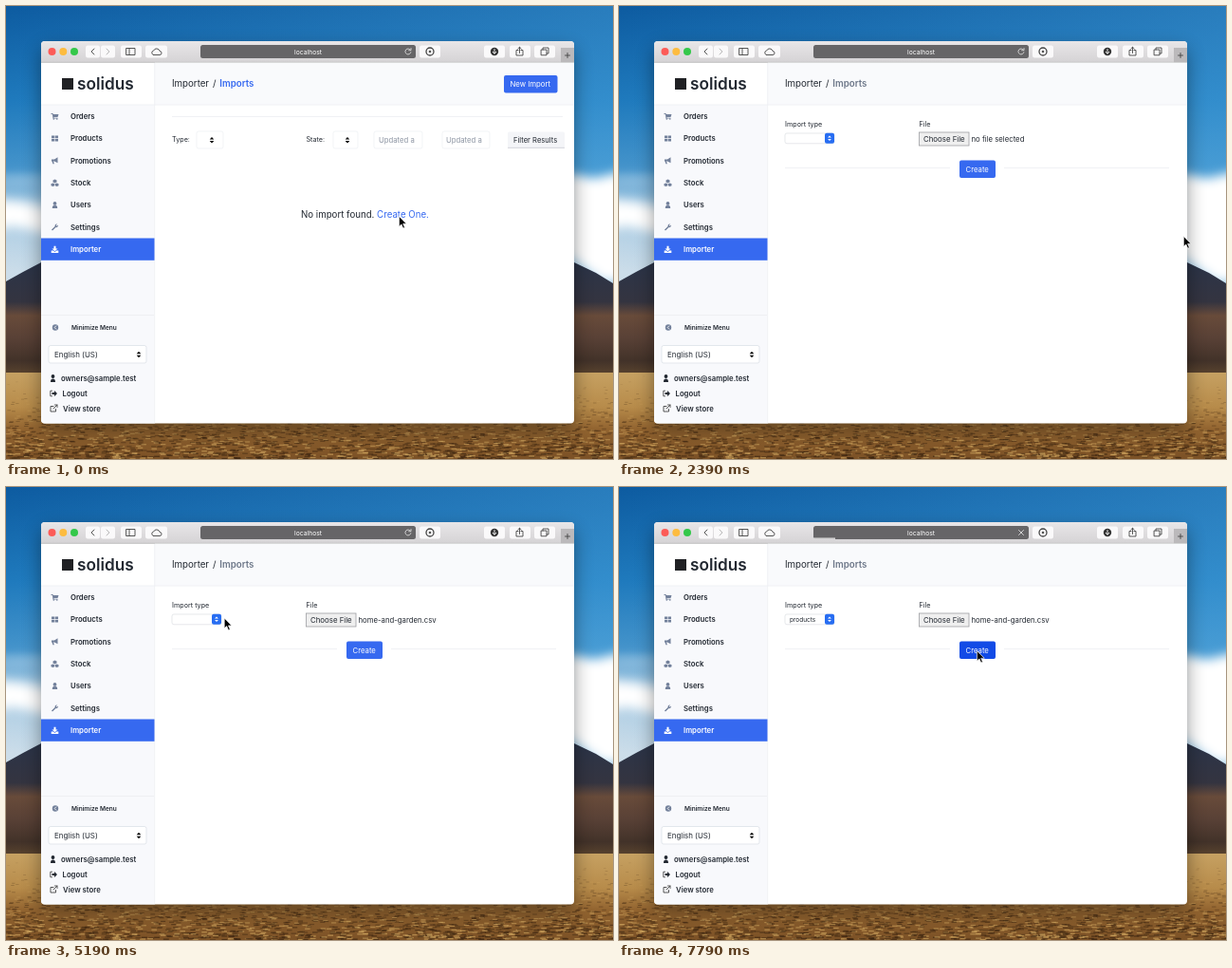
Recreate the animation shown at these times as an HTML page. Size 640x477 px, loop 7990 ms.

```html
<!DOCTYPE html>
<html lang="en">
<head>
<meta charset="utf-8">
<title>Importer</title>
<style>
  html, body { margin: 0; width: 100%; height: 100%; overflow: hidden; }
  svg { display: block; width: 100%; height: 100%; }
  text { font: 400 7.75px Inter, sans-serif; fill: #222831; white-space: pre; }
  .strong { font-weight: 600; }
  .label { font-size: 7.2px; }
  .title { font-size: 9.7px; }
  .small { font-size: 6.5px; }
  .link { fill: #3669f0; }
  .light { fill: #fff; }
  .muted { fill: #8d95a3; }
  .line { fill: none; stroke: #444; stroke-width: .9; stroke-linecap: round; stroke-linejoin: round; }
  .rule { stroke: #eceef2; stroke-width: .8; }
  .button { fill: #3669f0; }
</style>
</head>
<body>
<svg viewBox="0 0 640 477" preserveAspectRatio="none">
  <defs>
    <linearGradient id="sky" x2="0" y2="1">
      <stop stop-color="#0d5ba0"/><stop offset=".25" stop-color="#1f7abd"/>
      <stop offset=".43" stop-color="#4594cb"/><stop offset=".52" stop-color="#a3c8e2"/>
      <stop offset=".7" stop-color="#ccdde9"/>
    </linearGradient>
    <linearGradient id="glow">
      <stop stop-color="#4ba6e0" stop-opacity="0"/><stop offset="1" stop-color="#4ba6e0" stop-opacity=".45"/>
    </linearGradient>
    <linearGradient id="hill" x2="0" y2="1">
      <stop stop-color="#2b3448"/><stop offset=".34" stop-color="#343440"/>
      <stop offset=".46" stop-color="#684b3a"/><stop offset=".65" stop-color="#594136"/>
      <stop offset=".85" stop-color="#423229"/><stop offset="1" stop-color="#614930"/>
    </linearGradient>
    <linearGradient id="field" x2="0" y2="1">
      <stop stop-color="#c6a162"/><stop offset=".4" stop-color="#b78b4a"/>
      <stop offset=".65" stop-color="#926430"/><stop offset="1" stop-color="#7b5126"/>
    </linearGradient>
    <linearGradient id="bar" x2="0" y2="1">
      <stop stop-color="#e8e6e8"/><stop offset="1" stop-color="#d5d3d5"/>
    </linearGradient>
    <filter id="soft" x="-50%" y="-50%" width="200%" height="200%"><feGaussianBlur stdDeviation="6"/></filter>
    <filter id="shade" x="-20%" y="-20%" width="140%" height="150%"><feGaussianBlur stdDeviation="10"/></filter>
    <filter id="near" x="-30%" y="-30%" width="160%" height="180%"><feGaussianBlur stdDeviation="2.5"/></filter>
    <clipPath id="frame"><rect x="37" y="37" width="562" height="402.5" rx="4"/></clipPath>
    <path id="updown" d="M-2.3-.8 0-3.3 2.3-.8zM-2.3.8 0 3.3 2.3.8z"/>
  </defs>

  <!-- landscape -->
  <rect width="640" height="400" fill="url(#sky)"/>
  <rect width="640" height="400" fill="url(#glow)"/>
  <g fill="#fff" filter="url(#soft)">
    <path d="M-20 203 20 207 50 214V242L10 232-20 236z"/>
    <path d="M590 176 620 182 660 172V290H630L590 262z"/>
    <ellipse cx="15" cy="183" rx="30" ry="4" opacity=".35"/>
  </g>
  <path d="M0 290 18 280 37 270H599L622 281 640 292V392H0z" fill="url(#hill)"/>
  <rect y="386" width="640" height="91" fill="url(#field)"/>
  <g id="grass"></g>

  <!-- window -->
  <rect x="37" y="45" width="562" height="401" rx="8" opacity=".4" filter="url(#shade)"/>
  <g clip-path="url(#frame)">
    <rect x="37" y="37" width="562" height="403" fill="#fff"/>
    <rect x="37" y="37" width="562" height="22.5" fill="url(#bar)"/>
    <path d="M37 59.3H599" stroke="#b5b3b5" stroke-width=".7"/>
    <circle cx="48.5" cy="48" r="4" fill="#fc5b57"/>
    <circle cx="60.3" cy="48" r="4" fill="#fdbc40"/>
    <circle cx="72" cy="48" r="4" fill="#34c84a"/>
    <g id="tools" fill="#faf9fa"></g>
    <path class="line" d="M93 45l-3 3 3 3M127 44.5h9v7h-9zM130 44.5v7M155.5 51.5h6.5a2 2 0 0 0 0-4 3.3 3.3 0 0 0-6.3-.5 2.3 2.3 0 0 0-.2 4.5M540 46.5h-2v5.5h7v-5.5h-2M541.5 49.5v-6M539.7 45l1.8-1.7 1.8 1.7M566 46v-2h6v6h-2M564.5 46h5.5v5.8h-5.5z"/>
    <path class="line" d="M106 45l3 3-3 3" opacity=".4"/>
    <circle cx="447" cy="48" r="4" class="line" style="stroke-width:1.3"/><circle cx="447" cy="48" r="1.3" fill="#555"/>
    <circle cx="515" cy="48" r="4.2" fill="#333"/>
    <path d="M515 45.5v4.5M513.2 48.3l1.8 1.9 1.8-1.9" class="line" style="stroke:#fff"/>
    <path d="M585 44h14v15.5h-14z" fill="#bbb9bb"/>
    <path class="line" d="M589.5 52h5M592 49.5v5"/>
    <rect x="205" y="41" width="227" height="14" rx="2.5" fill="#666567"/>
    <text x="304" y="50.6" class="light" style="font-size:6.8px">localhost</text>
    <path id="reload" class="line" style="stroke:#ddd" d="M426.5 46.3a3 3 0 1 0 .4 2.4M427 44.5v2.2h-2.3"/>
    <path id="stop" class="line" style="stroke:#ddd" d="M421.5 45.5l5 5M426.5 45.5l-5 5"/>
    <rect id="progress" x="205" y="53.5" height="1.4" fill="#ddd"/>

    <!-- sidebar and header -->
    <rect x="37" y="104" width="119.5" height="336" fill="#f8f9fc"/>
    <rect x="157" y="59.7" width="442" height="44.3" fill="#f9fafc"/>
    <path class="rule" d="M37 104H599M156.7 60V440M37 325.5H156"/>
    <rect x="59" y="76" width="12" height="12" fill="#202124"/>
    <text x="75" y="87.5" style="font-size:17.2px;font-weight:600">solidus</text>
    <rect x="37" y="244.5" width="119.5" height="23.3" class="button"/>
    <g id="nav"></g>
    <circle cx="52" cy="338.5" r="3.2" fill="#73819b"/>
    <path d="M52.8 336.9l-1.6 1.6 1.6 1.6" class="line" style="stroke:#fff"/>
    <text x="69" y="340.8" class="strong small">Minimize Menu</text>
    <rect x="45" y="357.5" width="103" height="18.5" rx="2" fill="#fff" stroke="#d9dee6" stroke-width=".7"/>
    <text x="51" y="369.7" style="font-size:7.9px">English (US)</text>
    <use href="#updown" x="140" y="367"/>
    <path fill="#222831" d="M47 396c0-3 1-3.6 2.5-3.6s2.5.6 2.5 3.6zM51.4 390a1.9 1.9 0 1 1-3.8 0 1.9 1.9 0 0 1 3.8 0M48.5 407h2.5v-2l3 3-3 3v-2h-2.5z"/>
    <path class="line" d="M48.5 405.2h-1.7v5.6h1.7M50 421.5h-3v5.5h5.5v-2.5M50 424l4-4M51.5 420h2.5v2.5"/>
    <text x="58" y="394.7" class="strong">owners@sample.test</text>
    <text x="59.5" y="410.7" class="strong">Logout</text>
    <text x="60" y="426.7" class="strong">View store</text>
    <text x="175" y="84.6" class="title">Importer</text>
    <text x="218" y="84.6" class="title">/</text>
    <text x="225.3" y="84.6" class="title strong" id="crumb">Imports</text>

    <!-- list page -->
    <g id="listPage">
      <path class="rule" d="M175 116.5H587"/>
      <rect x="525" y="73" width="56.5" height="18.5" rx="2" class="button"/>
      <text x="531.5" y="85" class="light">New Import</text>
      <g fill="none" stroke="#eceff3" stroke-width=".7">
        <rect x="201" y="132" width="28" height="18" rx="2"/><rect x="345" y="132" width="26" height="18" rx="2"/>
        <rect x="388" y="132" width="51" height="18" rx="2"/><rect x="460" y="132" width="50" height="18" rx="2"/>
      </g>
      <text x="175" y="143" class="label">Type:</text><use href="#updown" x="217" y="141.3"/>
      <text x="316.5" y="143" class="label">State:</text><use href="#updown" x="360" y="141.3"/>
      <text x="393" y="143.8" class="muted">Updated a</text>
      <text x="464" y="143.8" class="muted">Updated a</text>
      <rect x="529" y="132.5" width="60" height="17" rx="1.5" fill="#f4f5f8"/>
      <path d="M529 149.3h60" stroke="#c9ccd3" stroke-width=".8"/>
      <text x="535" y="143.8" style="font-size:7.6px">Filter Results</text>
      <text x="311" y="222.6" class="title">No import found. <tspan class="link">Create One.</tspan></text>
    </g>

    <!-- form page -->
    <g id="formPage">
      <text x="175" y="126.5" class="label">Import type</text>
      <text x="316.5" y="126.5" class="label">File</text>
      <rect x="175" y="134" width="52" height="10.8" rx="2" fill="#fff" stroke="#dcdee2" stroke-width=".7"/>
      <rect x="217" y="133.8" width="10" height="11" rx="2" fill="#276df2"/>
      <use href="#updown" fill="#fff" transform="translate(222 139.3) scale(.85)"/>
      <text id="chosenType" x="180" y="141.6" class="small">products</text>
      <rect id="choose" x="316.5" y="133" width="52.5" height="14" stroke="#9d9fa3" stroke-width=".8"/>
      <text x="321" y="142.9" style="font-size:7.85px">Choose File</text>
      <text id="fileName" x="371.5" y="142.9"></text>
      <path class="rule" d="M175 170.5H349M406 170.5H580"/>
      <rect id="create" x="359" y="162.5" width="38" height="18.5" rx="2"/>
      <text x="365.5" y="174.5" class="light">Create</text>
    </g>
    <g id="menu">
      <rect x="167" y="135" width="59" height="44" rx="3" opacity=".4" filter="url(#near)"/>
      <rect x="167" y="132" width="58.5" height="44.5" rx="2.5" fill="#f8f8f8" stroke="#d0d0d0" stroke-width=".5"/>
      <rect id="highlight" x="167" width="58.5" height="9.6" fill="#0b50cc"/>
      <path id="check" class="line" d="M171 140l1.3 1.5 2.5-4"/>
      <g id="options"></g>
    </g>
  </g>

  <g id="pointer">
    <g id="drag">
      <circle r="28" fill="#fff" fill-opacity=".4" stroke="#1c1c1c" stroke-width="1.2"/>
      <path d="M-18-18h29l7 7v21h-36z" fill="#f4f4f4" opacity=".85"/>
      <text x="-8" y="5.5" class="muted" style="font-size:6px">csv</text>
      <rect x="-28" y="16.5" width="46" height="20" rx="2" fill="#1f5fd6"/>
      <text x="-25" y="24.3" class="light strong" style="font-size:7.4px">home-and-</text>
      <text x="-25" y="33.8" class="light strong" style="font-size:7.4px">garden.csv</text>
      <circle cx="7" cy="15" r="6.5" fill="#27a52c" stroke="#fff" stroke-width=".6"/>
      <path d="M3.5 15h7M7 11.5v7" stroke="#fff" stroke-width="1.8"/>
    </g>
    <path d="M0 0V10.8L2.5 8.5 4.3 12.7 6.1 11.9 4.3 7.9H7.8z" transform="translate(.4 .4)" fill="#000" stroke="#fff" stroke-width=".7"/>
  </g>
</svg>
<script>
const el = Object.fromEntries([...document.querySelectorAll('[id]')].map(e => [e.id, e]));

// Field texture: smooth at the horizon, coarse dark and golden tufts in front
let seed = 7;
const random = () => (seed = seed * 16807 % 2147483647) / 2147483647;
const tuft = () => {
  const depth = Math.sqrt(random()), y = 388 + depth * 89;
  const tone = ['#38220f', '#4e3317', '#d3a961'][random() * 3 | 0];
  return `<path d="M${random() * 640} ${y}h${2 + depth * 4}" stroke="${tone}" stroke-width="${.4 + depth}" opacity="${.15 + depth * .5}"/>`;
};
el.grass.innerHTML = Array.from({ length: 2600 }, tuft).join('');

el.tools.innerHTML = [[84, 15], [100, 15], [121, 22], [147, 23], [436, 22], [504, 22], [531, 22], [557, 22]]
  .map(([x, width]) => `<rect x="${x}" y="41.5" width="${width}" height="13" rx="2.5"/>`).join('');

// Icons are drawn in a box from -4 to 4
const nav = [
  ['Orders', 'M-4-3h2l.3 1H4L3 1h-4v.7h4v.8h-5L-2.6-2H-4zM-2 3a.8.8 0 1 0 1.6 0 .8.8 0 0 0-1.6 0M1.5 3a.8.8 0 1 0 1.6 0 .8.8 0 0 0-1.6 0'],
  ['Products', 'M-3.5-3h3.2v2.7h-3.2zM.3-3h3.2v2.7H.3zM-3.5.3h3.2V3h-3.2zM.3.3h3.2V3H.3z'],
  ['Promotions', 'M-3.5-1.3h3L3-3.5v6L-.5.7h-1L-.6 3.5h-1.5L-3 .7h-.5z'],
  ['Stock', 'M0-3.7 2-2.7V-.6L0 .3-2-.6v-2.1zM-2.2.2-.3 1v2l-1.9.8L-4 3V1zM2.2.2 4 1v2l-1.8.8L.3 3V1z'],
  ['Users', 'M-2.7 3.5C-2.7.7-2 .3 0 .3s2.7.4 2.7 3.2zM-1.9-1.7a1.9 1.9 0 1 1 3.8 0 1.9 1.9 0 0 1-3.8 0'],
  ['Settings', 'M-3.5 2.5.1-1.1C-.2-2.6 1-3.8 2.5-3.4L1.3-2.1l.8.8 1.3-1.2C3.8-1 2.6.4 1.1.1L-2.5 3.5z'],
  ['Importer', 'M-1-3.7h2V-1h2L0 1.8-3-1h2zM-3.8 1h2L0 2.6 1.8 1h2v2.6h-7.6z'],
];
el.nav.innerHTML = nav.map(([name, icon], i) => {
  const y = 116 + i * 23.4, active = name === 'Importer';
  return `<path d="${icon}" transform="translate(51.5 ${y})" fill="${active ? '#fff' : '#73819b'}"/>
    <text x="68" y="${y + 2.8}" class="strong ${active ? 'light' : ''}">${name}</text>`;
}).join('');

const ROW = 9.6;
const rowTop = row => 135 + row * ROW;
el.options.innerHTML = ['customers', 'orders', 'products']
  .map((name, i) => `<text x="180" y="${rowTop(i + 1) + 7}" class="small">${name}</text>`).join('');
const options = [...el.options.children];

// Pointer route: tick, x, y
const route = [
  [0, 414, 221], [3, 414, 221], [8, 409, 219.5], [10, 409, 219.5], [13, 660, 250], [17, 660, 200],
  [21, 347.5, 141], [23, 347.5, 141], [27, 208, 137], [30, 208, 137], [34, 212, 167.5], [35, 212, 167.5],
  [38, 377, 172], [40, 377, 172],
];
function pointerAt(tick) {
  const i = route.findIndex(stop => stop[0] > tick);
  const [t0, x0, y0] = route[i - 1], [t1, x1, y1] = route[i];
  const p = (tick - t0) / (t1 - t0), ease = p * p * (3 - 2 * p);
  return [x0 + (x1 - x0) * ease, y0 + (y1 - y0) * ease];
}

const show = (node, visible) => { node.style.display = visible ? '' : 'none'; };
const LOOP = 7990, TICK = 200;

function draw(time) {
  const tick = Math.floor((time % LOOP + 10) / TICK);
  const [x, y] = pointerAt(tick);
  const onForm = tick >= 4, dragging = tick >= 17 && tick < 23, dropped = tick >= 23;
  const loading = tick >= 38;

  el.pointer.setAttribute('transform', `translate(${x} ${y})`);
  show(el.drag, dragging);
  show(el.listPage, !onForm);
  show(el.formPage, onForm);
  el.crumb.style.fill = onForm ? '#6c7688' : '#3669f0';
  el.choose.setAttribute('fill', dragging && x < 375 ? '#96989c' : '#efefef');
  el.fileName.textContent = dropped ? 'home-and-garden.csv' : 'no file selected';

  const row = Math.max(0, Math.min(3, Math.floor((y - rowTop(0)) / ROW)));
  show(el.menu, tick >= 28 && tick < 35);
  el.highlight.setAttribute('y', rowTop(row));
  el.check.style.stroke = row ? '#444' : '#fff';
  options.forEach((option, i) => option.classList.toggle('light', i + 1 === row));
  show(el.chosenType, tick >= 35);

  el.create.setAttribute('fill', loading ? '#124be6' : '#3669f0');
  show(el.reload, !loading);
  show(el.stop, loading);
  el.progress.setAttribute('width', loading ? (tick - 37) * 11.5 : 0);
}

const start = performance.now();
function loop() {
  draw(performance.now() - start);
  requestAnimationFrame(loop);
}
loop();
</script>
</body>
</html>
```
